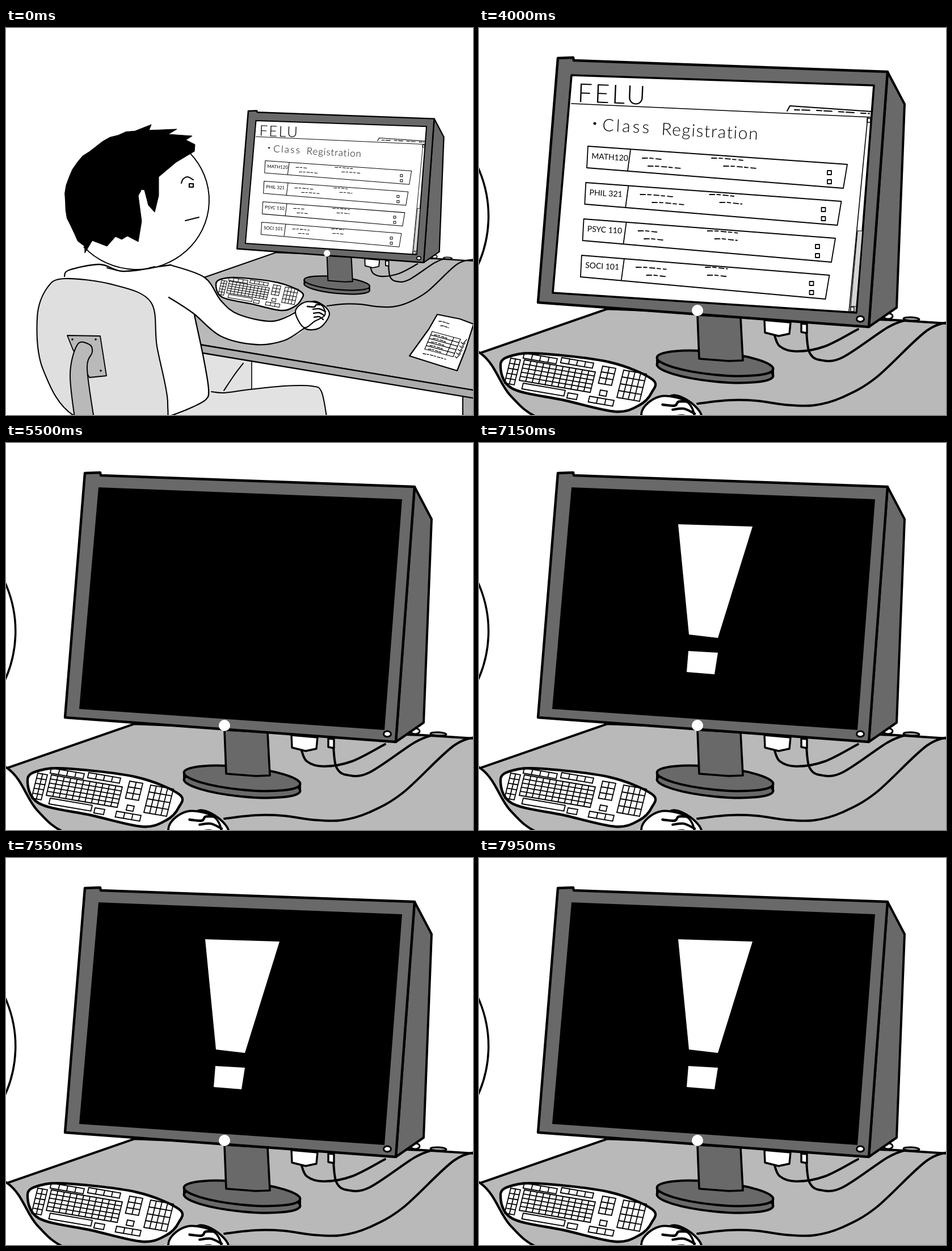
Recreate the animation shown at these times as an HTML page with a canvas. Size 823 by 681 pixels, loop 8000 ms.

```html
<!DOCTYPE html>
<html lang="en">
<head>
<meta charset="utf-8">
<title>Class registration</title>
<style>
html, body { margin: 0; width: 100%; height: 100%; overflow: hidden; background: #fff; }
canvas { display: block; }
</style>
</head>
<body>
<canvas id="stage" width="823" height="681"></canvas>
<script>
const ctx = document.getElementById('stage').getContext('2d');
const ZOOM = 1.773, PAN_X = 618, PAN_Y = 206, LOOP = 8000;
const GREY = '#b9b9b9', EDGE = '#acacac', CHAIR = '#dfdfdf', LEGS = '#e2e2e2', CASE = '#696969';
ctx.lineJoin = ctx.lineCap = 'round';

function seeded(seed) {
  return () => (seed = seed * 16807 % 2147483647) / 2147483647;
}

// Trace flat x,y pairs, straight or as a Catmull-Rom curve.
function trace(p, smooth, closed) {
  const n = p.length / 2;
  const at = i => {
    i = closed ? (i + n) % n : Math.max(0, Math.min(n - 1, i));
    return [p[2 * i], p[2 * i + 1]];
  };
  ctx.beginPath();
  ctx.moveTo(p[0], p[1]);
  for (let i = 0; i < (closed ? n : n - 1); i++) {
    const a = at(i - 1), b = at(i), c = at(i + 1), d = at(i + 2);
    if (smooth) {
      ctx.bezierCurveTo(b[0] + (c[0] - a[0]) / 6, b[1] + (c[1] - a[1]) / 6,
        c[0] - (d[0] - b[0]) / 6, c[1] - (d[1] - b[1]) / 6, c[0], c[1]);
    } else ctx.lineTo(c[0], c[1]);
  }
  if (closed) ctx.closePath();
}

function paint(fill, width) {
  if (fill) { ctx.fillStyle = fill; ctx.fill(); }
  if (width) { ctx.strokeStyle = '#000'; ctx.lineWidth = width; ctx.stroke(); }
}

function poly(p, fill, width) { trace(p, false, true); paint(fill, width); }
function blob(p, fill, width) { trace(p, true, true); paint(fill, width); }
function line(p, width) { trace(p, false, false); paint(null, width); }
function curve(p, width) { trace(p, true, false); paint(null, width); }

function oval(x, y, rx, ry, fill, width, tilt = 0, from = 0, to = 7) {
  ctx.beginPath();
  ctx.ellipse(x, y, rx, ry, tilt, from, to);
  paint(fill, width);
}

function box(x, y, w, h, fill, width) {
  ctx.beginPath();
  ctx.rect(x, y, w, h);
  paint(fill, width);
}

// Slanted grid: tilt lowers it to the right, lean shifts it left going down.
function grid(x, y, w, h, cols, rows, tilt, lean, width) {
  const at = (u, v) => [x + u * w - v * h * lean, y + v * h + u * w * tilt];
  for (let c = 0; c <= cols; c++) line([...at(c / cols, 0), ...at(c / cols, 1)], width);
  for (let r = 0; r <= rows; r++) line([...at(0, r / rows), ...at(1, r / rows)], width);
}

function scribble(x, y, length, slope, width, pattern) {
  ctx.setLineDash(pattern);
  line([x, y, x + length / 3, y + length * slope / 3 - 1, x + length, y + length * slope], width);
  ctx.setLineDash([]);
}

function label(text, x, y, font, angle = 0, spacing = 0, bold = 0) {
  ctx.save();
  ctx.translate(x, y);
  ctx.rotate(angle);
  ctx.font = font + ' Lato, "Open Sans", sans-serif';
  ctx.letterSpacing = spacing + 'px';
  ctx.fillStyle = ctx.strokeStyle = '#000';
  ctx.fillText(text, 0, 0);
  if (bold) { ctx.lineWidth = bold; ctx.strokeText(text, 0, 0); }
  ctx.restore();
}

function page() {
  poly([163, 83, 696, 101, 665, 501, 130, 466], '#fff', 3.6);
  line([163, 133, 692, 157], 1.7);
  label('FELU', 173, 130, '300 46px', 0.04, 4);
  line([543, 146, 548, 137, 692, 147], 2);
  scribble(556, 144, 132, 0.05, 2, [9, 4, 14, 12]);

  oval(204, 168, 2.5, 2.5, '#000');
  label('Class', 217, 181, '300 30px', 0.05, 4);
  label('Registration', 321, 188, '300 30px', 0.05, 1.6);

  const random = seeded(41);
  ['MATH120', 'PHIL 321', 'PSYC 110', 'SOCI 101'].forEach((code, i) => {
    const x = 192 - 3.7 * i, y = 208 + 64 * i;
    const right = 649 - 10.5 * i, end = 240 + 65 * i, split = x + 75;
    poly([x, y, right, end, right - 7, end + 42, x - 2, y + 38], null, 1.8);
    line([split, y + 6, split - 5, y + 43], 1.8);
    label(code, x + 6, y + 22, '400 14px', 0.06);
    for (const offset of [96, 218]) {
      scribble(x + offset, y + 21, 35 + 25 * random(), 0.07, 1.8, [9, 4, 6, 5]);
      scribble(x + offset + 25 * random(), y + 35, 30 + 30 * random(), 0.07, 1.8, [9, 4, 6, 5]);
    }
    for (const drop of [13, 29]) box(right - 35, end + drop - 2, 7, 7, null, 1.8);
  });

  poly([667, 357, 676, 357, 665, 490, 655, 490], '#d5d5d5', 1.2);
  line([685, 157, 652, 499], 1.6);
  box(684, 159, 6, 7, null, 1.6);
  box(655, 491, 6, 8, null, 1.6);
}

function blackScreen(alert) {
  poly([163, 78, 698, 99, 667, 505, 129, 468], '#000');
  if (!alert) return;
  poly([351, 143, 482, 147, 421, 343, 370, 337], '#fff');
  poly([369, 366, 421, 369, 415, 407, 366, 403], '#fff');
}

function cables() {
  curve([385, 661, 440, 655, 490, 656, 540, 663, 590, 664, 640, 650, 700, 615, 790, 532, 842, 516], 4);
  curve([520, 538, 530, 560, 560, 569, 610, 560, 668, 530], 4);
  curve([577, 535, 582, 570, 600, 584, 640, 580, 720, 527, 755, 513], 4);
  poly([503, 514, 549, 518, 547, 538, 528, 542, 504, 536], '#fff', 3.4);
  poly([568, 520, 578, 521, 578, 537, 568, 535], '#fff', 3.4);
  oval(762, 512, 14, 3, EDGE, 3, 0.05);
  oval(721, 507, 8, 5, '#fff', 3);
}

function monitor(screen) {
  for (const drop of [12, 0]) oval(416, 590 + drop, 103, 20, CASE, 4, 0.1);
  line([314, 580, 314, 592], 4);
  line([518, 600, 518, 612], 4);
  poly([385, 505, 461, 509, 465, 585, 440, 586, 388, 582], CASE, 3.6);

  poly([720, 77, 750, 134, 736, 492, 687, 526], CASE, 4);
  poly([139, 53, 166, 52, 167, 57, 720, 77, 687, 526, 104, 483], CASE, 4.4);
  screen();
  oval(385, 497, 10, 10, '#fff');
  oval(672, 512, 6.5, 5, '#fff', 3);
}

function keyboard() {
  blob([38, 592, 60, 576, 110, 573, 230, 588, 305, 618, 304, 642, 282, 664, 240, 675, 150, 655, 58, 634], '#fff', 4.4);
  const groups = [
    [80, 584, 125, 36, 11, 5], [56, 581, 17, 44, 2, 5], [80, 572, 58, 9, 4, 1], [146, 580, 56, 9, 4, 1],
    [218, 595, 23, 30, 2, 3], [255, 602, 40, 48, 4, 4], [78, 625, 74, 10, 1, 1],
    [157, 642, 17, 9, 1, 1], [214, 637, 12, 9, 1, 1], [195, 648, 43, 10, 3, 1]
  ];
  for (const g of groups) grid(...g, 0.17, 0.25, 1.8);
}

function furniture() {
  poly([345, 565, 433, 582, 433, 638, 390, 646, 345, 646], LEGS);
  line([433, 582, 433, 638], 1.6);
  curve([418, 590, 402, 611, 384, 638], 2);
  trace([362, 640, 385, 642, 430, 636, 490, 630, 538, 630, 556, 640, 566, 690], true, false);
  ctx.lineTo(290, 690);
  paint(LEGS, 2);

  box(805, 645, 40, 60, EDGE, 2);
  poly([476, 395, 349, 439, 325, 470, 335, 556, 840, 640, 840, 411, 760, 406], GREY, 2.3);
  poly([335, 556, 840, 640, 840, 654, 335, 570], EDGE, 2.3);
}

function paper() {
  poly([760, 504, 800, 512, 824, 521, 810, 565, 795, 603, 765, 594, 711, 577, 745, 530], '#fff', 2.2);
  grid(751, 534, 50, 31, 1, 5, 0.27, 0.42, 1.2);
  line([789, 545, 776, 575], 1.2);
  for (let i = 0; i < 5; i++) {
    const x = 755 - 2.7 * i, y = 540 + 6.2 * i;
    scribble(x, y, 24, 0.27, 1.3, [5, 2, 3, 3]);
    line([x + 47, y + 13, x + 50, y + 16, x + 57, y + 8], 1.2);
  }
  scribble(763, 516, 18, 0.25, 1.3, [5, 2]);
  scribble(766, 524, 14, 0.25, 1.3, [5, 2]);
  scribble(735, 573, 40, 0.25, 1.3, [5, 2, 3, 3]);
}

function hand() {
  blob([535, 485, 553, 484, 570, 503, 552, 528, 525, 526], '#fff', 2.2);
  blob([510, 499, 528, 482, 555, 487, 562, 505, 544, 516, 525, 527], '#fff', 2.1);
  curve([531, 490, 543, 491, 547, 487, 556, 487], 2.5);
  for (let i = 0; i < 3; i++) curve([541 + i, 495 + 7 * i, 552, 494 + 7 * i, 563 - 2 * i, 499 + 7 * i], 2.3);
}

function body() {
  const shoulder = [103, 437, 111, 426, 165, 416, 205, 428, 260, 421, 290, 417];
  const upper = [290, 417, 350, 439, 379, 480, 410, 504, 470, 516, 513, 499];
  const lower = [526, 528, 490, 550, 440, 557, 378, 542, 330, 502, 287, 474];
  const side = [332, 505, 348, 580, 357, 635, 352, 654, 322, 670, 286, 684];

  // Torso first, then the arm across it.
  poly([...shoulder, 325, 428, ...side, 110, 690, 70, 560], '#fff');
  blob([...upper, ...lower], '#fff');
  for (const edge of [shoulder, upper, lower, side]) curve(edge, 2.3);
  hand();
}

function chair() {
  blob([103, 441, 190, 452, 255, 482, 266, 560, 285, 660, 265, 700, 125, 685, 65, 600, 55, 510, 72, 458], CHAIR, 2.1);
  poly([108, 541, 166, 542, 177, 612, 147, 615, 118, 566], GREY, 1.8);
  for (const [x, y] of [[117, 548], [158, 548], [167, 603]]) oval(x, y, 1.8, 1.8, '#000');
  trace([123, 700, 113, 610, 126, 557, 147, 557, 152, 570, 143, 600, 157, 700], true, false);
  paint(GREY, 2);
}

function hair() {
  const random = seeded(7), back = [];
  for (let a = 2.4; a < 4.7; a += 0.12) {
    const r = 0.985 + 0.03 * random() - 0.035 * Math.exp(-(((a - 4.1) / 0.35) ** 2));
    back.push(231 + 127 * r * Math.cos(a), 303 + 122 * r * Math.sin(a));
  }
  const fringe = [256, 170, 252, 180, 301, 178, 286, 187, 328, 190, 317, 197, 333, 205, 332, 217, 300, 236, 269, 262];
  const lock = [269, 295, 262, 324, 251, 312, 244, 285, 239, 284, 233, 295, 239, 340, 233, 376];
  const nape = [214, 366, 204, 372, 193, 367, 178, 384, 152, 374, 139, 396];
  poly([...back, ...fringe, ...lock, ...nape], '#000', 1);
}

function head(smile) {
  oval(231, 303, 124, 118, '#fff');
  oval(231, 303, 127, 122, '#fff', 2, 0, -0.75, 2.4);
  curve([178, 422, 205, 428, 235, 426, 262, 420], 2);
  hair();
  curve([309, 273, 312, 266, 320, 262, 330, 267], 2);
  box(323, 274, 7, 6, '#fff', 2.2);
  if (smile) {
    blob([310, 339, 318, 344, 330, 347, 339, 344, 340, 350, 330, 356, 312, 348], '#fff', 2.8);
    line([328, 361, 335, 359], 1.2);
  } else line([316, 339, 328, 336, 340, 333], 2);
}

function speech() {
  curve([0, 40, 30, 92, 50, 111, 74, 127, 76, 155, 90, 192, 119, 223], 1.2);
  curve([119, 223, 104, 195, 102, 167, 116, 130, 250, 128, 272, 124, 400, 131, 560, 127, 690, 131, 823, 120], 1.2);
  const lines = [
    [57, { 'Alright!': 46, 'One': 183, 'more': 260, 'click': 357, 'and': 450, 'I\u2019ll': 523, 'have': 581 }],
    [107, { 'finalized': 251, 'my': 405, 'class': 467, 'registration!': 559 }]
  ];
  for (const [y, words] of lines) {
    for (const word in words) label(word, words[word], y, '400 37px', 0, 0.2, 0.8);
  }
}

function render(t) {
  const close = t >= 4000, talking = t >= 500 && !close;
  const alert = t >= 6750 && Math.floor((t - 6750) / 200) % 2 === 0;
  ctx.setTransform(1, 0, 0, 1, 0, 0);
  ctx.fillStyle = '#fff';
  ctx.fillRect(0, 0, 823, 681);
  if (close) ctx.setTransform(ZOOM, 0, 0, ZOOM, -PAN_X, -PAN_Y);

  furniture();
  // The computer is laid out in close-up coordinates.
  ctx.save();
  ctx.transform(1 / ZOOM, 0, 0, 1 / ZOOM, PAN_X / ZOOM, PAN_Y / ZOOM);
  cables();
  monitor(t < 5500 ? page : () => blackScreen(alert));
  keyboard();
  ctx.restore();
  paper();
  body();
  chair();
  head(talking);
  if (talking) speech();
}

const start = performance.now();
function tick() {
  render((performance.now() - start) % LOOP);
  requestAnimationFrame(tick);
}
tick();
</script>
</body>
</html>
```
